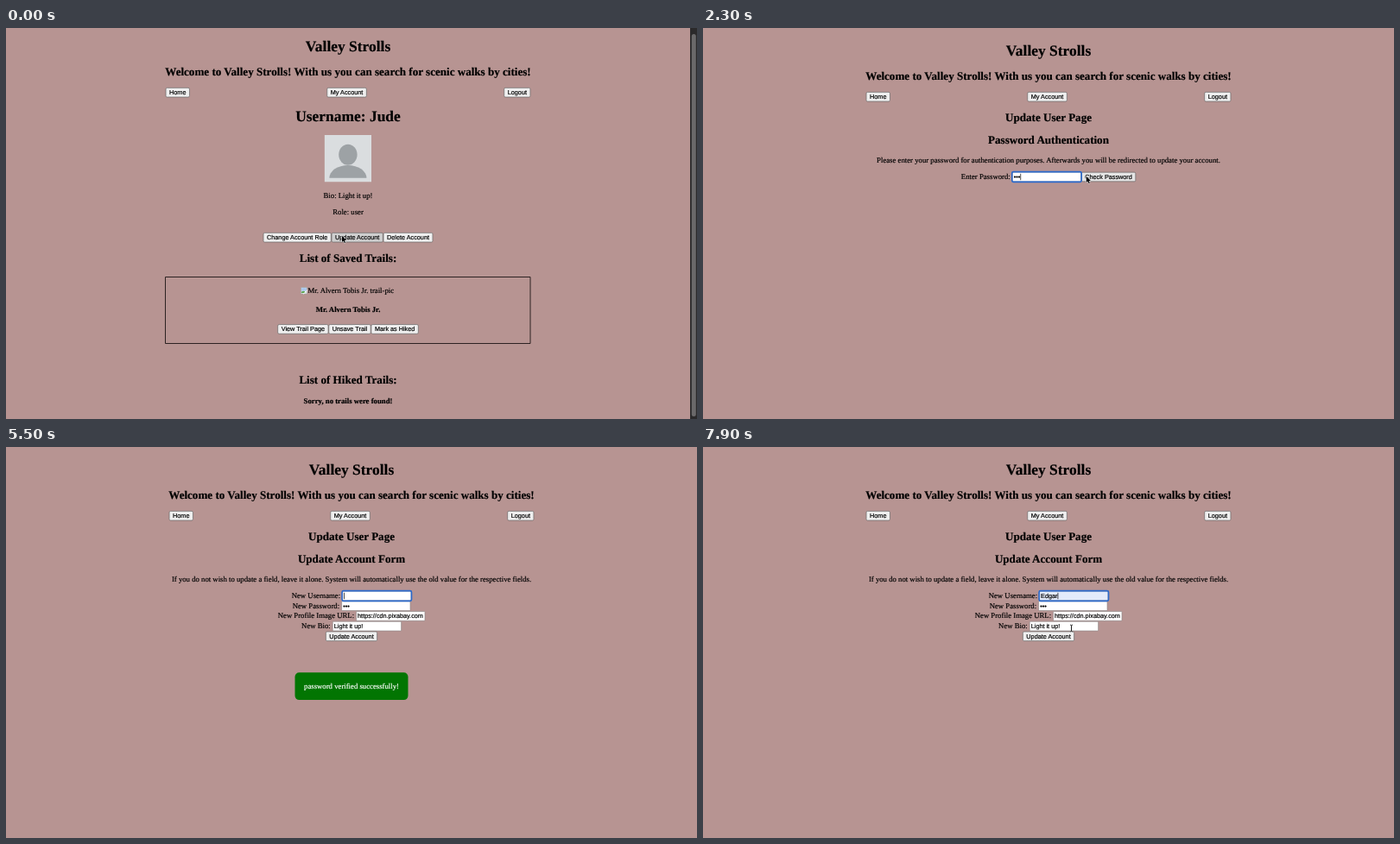
An HTML page with a canvas for the animation above (8 s loop, 800 by 453 pixels).

```html
<!DOCTYPE html>
<html lang="en">
<head>
<meta charset="utf-8">
<title>Valley Strolls</title>
<style>
  html, body { margin: 0; width: 100%; height: 100%; overflow: hidden; background: #b79492; }
  canvas { display: block; width: 800px; height: 453px; }
</style>
</head>
<body>
<canvas id="stage"></canvas>
<script>
const W = 800, H = 453, LOOP = 8000, STEP = 100;
const ZOOM = 0.5455; // the page is shown at a reduced scale
const SERIF = '"Liberation Serif", "Times New Roman", serif';
const SANS = '"Liberation Sans", Arial, sans-serif';
const H1 = `bold ${32 * ZOOM}px ${SERIF}`;
const H2 = `bold ${24 * ZOOM}px ${SERIF}`;
const BODY = `${16 * ZOOM}px ${SERIF}`;
const STRONG = `bold ${16 * ZOOM}px ${SERIF}`;
const UI = `${13.333 * ZOOM}px ${SANS}`;
const ROW_H = 11.4, FIELD_W = 80;
const OLD_NAME = 'Jude', NEW_NAME = 'Edgar';

const canvas = document.getElementById('stage');
const ctx = canvas.getContext('2d');
const dpr = window.devicePixelRatio || 1;
canvas.width = W * dpr;
canvas.height = H * dpr;

// A hairline stroke gives the slightly heavier smoothed lettering.
function text(str, x, y, font, align = 'left', color = '#000') {
  ctx.font = font;
  ctx.textAlign = align;
  ctx.fillStyle = ctx.strokeStyle = color;
  ctx.lineWidth = 0.18;
  ctx.fillText(str, x, y);
  ctx.strokeText(str, x, y);
}

function widthOf(str, font) {
  ctx.font = font;
  return ctx.measureText(str).width;
}

function box(x, y, w, h, r, fill, stroke, line = 0.7) {
  ctx.beginPath();
  ctx.roundRect(x, y, w, h, r);
  if (fill) { ctx.fillStyle = fill; ctx.fill(); }
  if (stroke) { ctx.strokeStyle = stroke; ctx.lineWidth = line; ctx.stroke(); }
}

function ellipse(x, y, rx, ry, from = 0, to = Math.PI * 2) {
  ctx.beginPath();
  ctx.ellipse(x, y, rx, ry, 0, from, to);
  ctx.fill();
}

const buttonWidth = label => widthOf(label, UI) + 16 * ZOOM;

function button(label, x, y, fill = '#efefef') {
  const w = buttonWidth(label);
  box(x + 0.35, y + 0.35, w - 0.7, ROW_H - 0.7, 1.5, fill, '#686666');
  text(label, x + w / 2, y + 8.2, UI, 'center');
  return x + w;
}

function buttonRow(labels, cx, y, fills = {}) {
  let x = cx - labels.reduce((sum, s) => sum + buttonWidth(s), 0) / 2;
  for (const s of labels) x = button(s, x, y, fills[s]);
}

function field(x, y, value, { focus, fill = '#fff', caret } = {}) {
  box(x + 0.3, y + 0.3, FIELD_W - 0.6, ROW_H - 0.6, 0.8, fill, '#858080', 0.6);
  if (focus) box(x - 0.2, y - 0.2, FIELD_W + 0.4, ROW_H + 0.4, 1.6, null, '#2a69cc', 1.6);
  ctx.save();
  ctx.beginPath();
  ctx.rect(x + 1, y, FIELD_W - 2, ROW_H);
  ctx.clip();
  text(value, x + 1.8, y + 8.1, UI);
  if (caret) {
    ctx.fillStyle = '#000';
    ctx.fillRect(x + 1.9 + widthOf(value, UI), y + 2, 0.7, 7.4);
  }
  ctx.restore();
}

// A centred line: label, field, and an optional trailing button.
function formLine(label, y, value, options, action) {
  const labelW = widthOf(label + ' ', BODY);
  const extra = action ? buttonWidth(action) : 0;
  const x = 400 - (labelW + FIELD_W + extra) / 2;
  text(label, x, y + 8.2, BODY);
  if (action) button(action, x + labelW + FIELD_W, y, options.buttonFill);
  field(x + labelW, y, value, options);
}

function header(cx, dy) {
  text('Valley Strolls', cx, 31.7 + dy, H1, 'center');
  text('Welcome to Valley Strolls! With us you can search for scenic walks by cities!',
    cx, 59.6 + dy, H2, 'center');
  const left = cx - 211.3, right = cx + 211.3, y = 74 + dy;
  button('Home', left, y);
  button('My Account', cx - 24.6, y);
  button('Logout', right - buttonWidth('Logout'), y);
}

function avatar(x, y) {
  ctx.save();
  ctx.beginPath();
  ctx.rect(x, y, 54.5, 54.5);
  ctx.clip();
  ctx.fillStyle = '#dadddf';
  ctx.fillRect(x, y, 54.5, 54.5);
  ctx.fillStyle = '#9da2a5';
  ellipse(x + 27.3, y + 22.7, 10.7, 12);
  ellipse(x + 27.3, y + 49.8, 21.6, 14.8, Math.PI, Math.PI * 2);
  ctx.restore();
}

function brokenImage(x, y) {
  box(x + 0.5, y + 0.5, 7, 7.5, 0.5, '#e8eef4', '#9a9a9a', 0.6);
  ctx.fillStyle = '#a9c7ee';
  ctx.fillRect(x + 1.1, y + 1.1, 5.8, 3.6);
  ctx.fillStyle = '#5fa552';
  ellipse(x + 3.2, y + 7, 2.4, 2.2, Math.PI, Math.PI * 2);
  ctx.strokeStyle = '#fff';
  ctx.lineWidth = 0.9;
  ctx.beginPath();
  ctx.moveTo(x + 3, y + 8.3);
  ctx.lineTo(x + 8, y + 3.6);
  ctx.stroke();
}

function accountPage(t) {
  const cx = 396;
  header(cx, -5);
  text(`Username: ${OLD_NAME}`, cx, 107.8, H1, 'center');
  avatar(368.6, 124);
  text('Bio: Light it up!', cx, 197.3, BODY, 'center');
  text('Role: user', cx, 216, BODY, 'center');
  buttonRow(['Change Account Role', 'Update Account', 'Delete Account'], cx, 237,
    { 'Update Account': t < 200 ? '#cfcfcf' : '#e2e2e2' });

  text('List of Saved Trails:', cx, 271.4, H2, 'center');
  box(184.5, 288.5, 422.5, 77, 0, null, '#1c1616', 0.9);
  brokenImage(341, 300);
  text('Mr. Alvern Tobis Jr. trail-pic', 349.6, 307.3, BODY);
  text('Mr. Alvern Tobis Jr.', cx, 329.3, STRONG, 'center');
  buttonRow(['View Trail Page', 'Unsave Trail', 'Mark as Hiked'], cx, 343.2);

  text('List of Hiked Trails:', cx, 412.2, H2, 'center');
  text('Sorry, no trails were found!', cx, 435.3, STRONG, 'center');

  ctx.fillStyle = '#2b2a2b';
  ctx.fillRect(792, 0, 8, H);
  box(793.8, 7, 5, 443, 2.5, '#6a696a');
}

// How many of the given moments have passed.
const passed = (t, times) => times.filter(m => t >= m).length;

function passwordPage(t) {
  const focus = t >= 1000;
  text('Password Authentication', 400, 133.7, H2, 'center');
  text('Please enter your password for authentication purposes. Afterwards you will be redirected to update your account.',
    400, 155.8, BODY, 'center');
  formLine('Enter Password:', 166.8, '•'.repeat(passed(t, [1200, 1400, 1600])), {
    focus, caret: focus, buttonFill: t >= 2900 ? '#f5f5f5' : t >= 2200 ? '#e5e5e5' : undefined
  }, 'Check Password');
}

function username(t) {
  if (t < 5400) return OLD_NAME.slice(0, 4 - passed(t, [4400, 4600, 4700, 4900]));
  return t >= 6500 ? NEW_NAME : NEW_NAME.slice(0, passed(t, [5700, 5900]));
}

function updatePage(t) {
  text('Update Account Form', 400, 133.7, H2, 'center');
  text('If you do not wish to update a field, leave it alone. System will automatically use the old value for the respective fields.',
    400, 155.8, BODY, 'center');
  const row = i => 166.8 + 11.7 * i;
  formLine('New Password:', row(1), '•••');
  formLine('New Profile Image URL:', row(2), 'https://cdn.pixabay.com');
  formLine('New Bio:', row(3), 'Light it up!');
  buttonRow(['Update Account'], 400, row(4));
  formLine('New Username:', row(0), username(t), {
    focus: t >= 3800, caret: t >= 4300, fill: t >= 6500 ? '#e3ebfb' : '#fff'
  });
  if (t < 7700) {
    box(334.5, 261.3, 131, 31.8, 5, '#027502');
    text('password verified successfully!', 400, 280.3, BODY, 'center', '#fff');
  }
}

function arrow(x, y) {
  const shape = [[0, 0], [0, 7.2], [1.7, 5.7], [2.8, 8.3], [4, 7.8], [2.9, 5.3], [5.1, 5.2]];
  ctx.beginPath();
  for (const [dx, dy] of shape) ctx.lineTo(x + dx, y + dy);
  ctx.closePath();
  ctx.lineWidth = 1;
  ctx.lineJoin = 'round';
  ctx.strokeStyle = '#eee';
  ctx.stroke();
  ctx.fillStyle = '#000';
  ctx.fill();
}

function beam(x, y) {
  const path = new Path2D(`M${x - 1.5} ${y - 4}q1.5 0 1.5 1.2v5.6q0 1.2 -1.5 1.2M${x + 1.5} ${y - 4}q-1.5 0 -1.5 1.2v5.6q0 1.2 1.5 1.2`);
  ctx.strokeStyle = 'rgba(255,255,255,.7)';
  ctx.lineWidth = 1.5;
  ctx.stroke(path);
  ctx.strokeStyle = '#111';
  ctx.lineWidth = 0.8;
  ctx.stroke(path);
}

// Pointer legs: start, end, from, to; it hides between them while typing.
const legs = [
  [0, 300, [389, 240.8], [389, 240.5]],
  [300, 1000, [389, 240.5], [418, 173]],
  [1000, 1200, [418, 173], [418, 173]],
  [1900, 2300, [418, 173], [443.8, 171.8]],
  [2300, 3100, [443.8, 171.8], [446, 171.5]],
  [3100, 3700, [446, 171.5], [447.5, 173]],
  [3700, 4400, [447.5, 173], [447.5, 173]],
  [6400, 7200, [436, 187], [426.5, 213]],
  [7200, 7900, [426.5, 213], [426.5, 210]],
  [7900, 8000, [426.5, 210], [426.5, 210]]
];

function pointer(t) {
  const leg = legs.find(([a, b]) => t >= a && t < b);
  if (!leg) return;
  const [a, b, from, to] = leg;
  const k = (t - a) / (b - a), e = k * k * (3 - 2 * k);
  const [x, y] = from.map((v, i) => v + (to[i] - v) * e);
  const overField = (t >= 900 && t < 2100) || t >= 3300;
  (overField ? beam : arrow)(x, y);
}

function draw(now) {
  const t = Math.floor((now % LOOP) / STEP) * STEP;
  ctx.setTransform(dpr, 0, 0, dpr, 0, 0);
  ctx.textRendering = 'geometricPrecision';
  ctx.lineJoin = 'round';
  ctx.fillStyle = '#b79492';
  ctx.fillRect(0, 0, W, H);
  if (t < 300) {
    accountPage(t);
  } else {
    header(400, 0);
    text('Update User Page', 400, 107.9, H2, 'center');
    (t < 3000 ? passwordPage : updatePage)(t);
  }
  pointer(t);
}

const start = performance.now();
function tick() {
  draw(performance.now() - start);
  requestAnimationFrame(tick);
}
tick();
</script>
</body>
</html>
```
